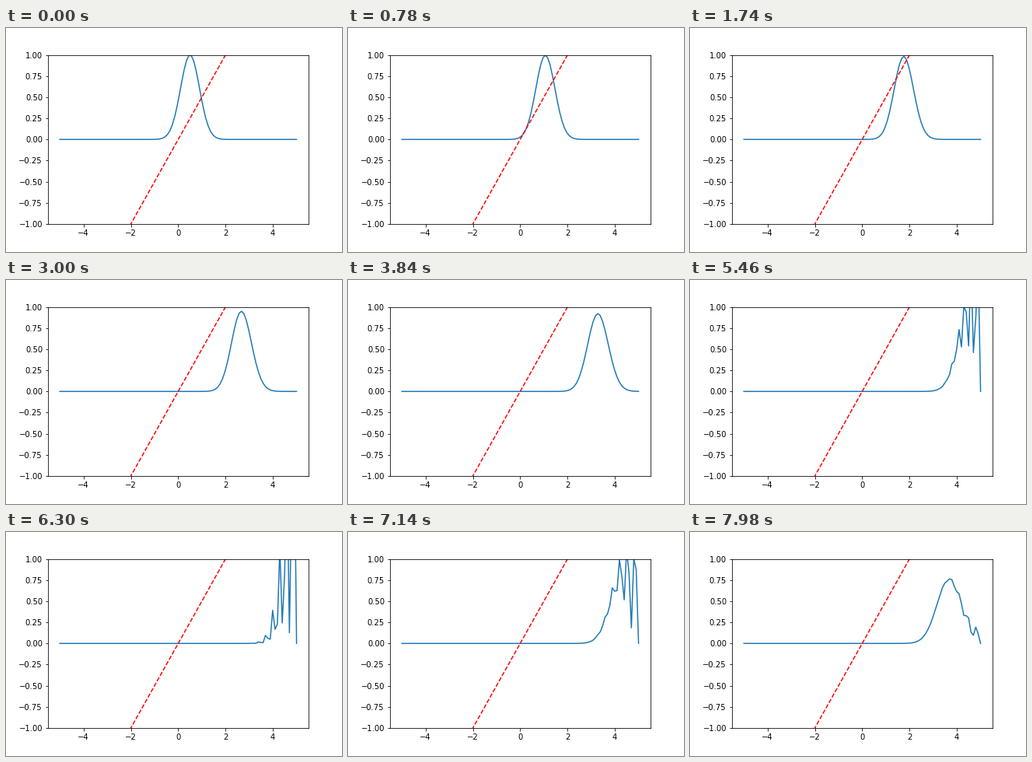
Recreate the animation shown at these times as a matplotlib script. Size 432x288 px, loop 8 s.

```python
import numpy as np
import matplotlib.pyplot as plt
from matplotlib.animation import FuncAnimation

POINTS = 100
DT = 0.00493          # simulated time per step
TICK = 20             # ms per drawn frame
HOLD = 3              # drawn frames per step
FRAMES = 400

x = np.linspace(-5, 5, POINTS)
dx = x[1] - x[0]

# Gaussian packet moving right inside a box with hard walls
x0, sigma, k0 = 0.5, 0.4, 20
start = np.exp(-((x - x0) / (2 * sigma)) ** 2 + 1j * k0 * x)[1:-1]

inner = POINTS - 2
hop = np.full(inner - 1, -0.5 / dx**2)
hamiltonian = np.eye(inner) / dx**2 + np.diag(hop, 1) + np.diag(hop, -1)
energy, modes = np.linalg.eigh(hamiltonian)
weights = modes.T @ start


def density(step):
    psi = modes @ (weights * np.exp(-1j * energy * step * DT))
    return np.pad(np.abs(psi) ** 2, 1)


plt.rcParams.update({"font.family": "DejaVu Sans", "font.size": 10})
fig, ax = plt.subplots(figsize=(6, 4), dpi=72)
fig.subplots_adjust(left=0.125, right=0.9, bottom=0.125, top=0.88)
wave, = ax.plot(x, density(0))
ax.plot(x, x / 2, "r--")
ax.set_xlim(-5.5, 5.5)
ax.set_ylim(-1, 1)


def update(frame):
    wave.set_ydata(density(frame // HOLD))
    return wave,


anim = FuncAnimation(fig, update, frames=FRAMES, interval=TICK,
                     repeat=True, repeat_delay=0)
plt.show()
```
